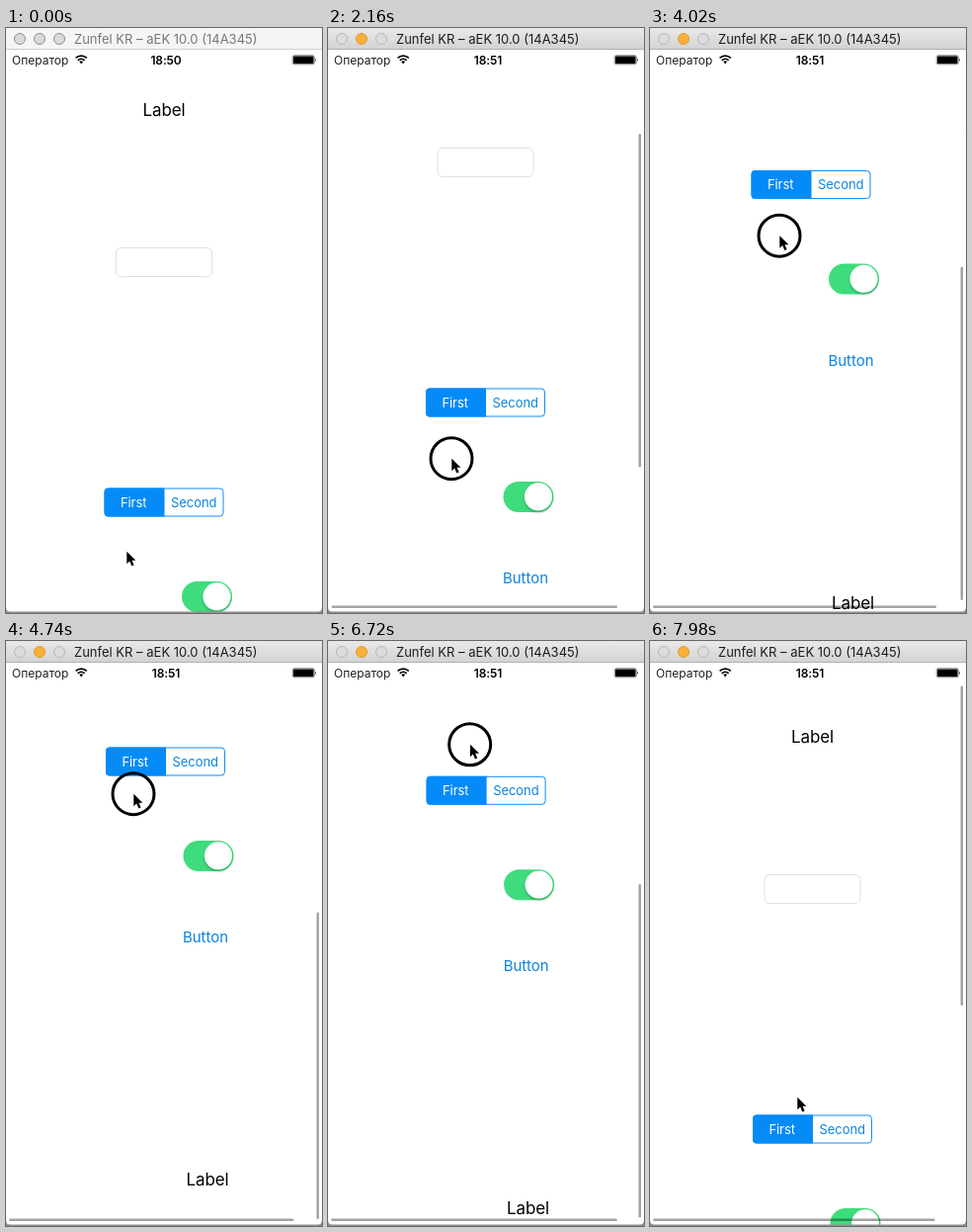
Recreate the animation shown at these times as an HTML page. Size 320x592 px, loop 8 s.

```html
<!DOCTYPE html>
<html lang="en">
<head>
<meta charset="utf-8">
<title>Scroll view demo</title>
<style>
  html, body { margin: 0; width: 100%; height: 100%; overflow: hidden; background: #fff; }
  svg { display: block; width: 320px; height: 592px; font-family: Inter, Roboto, sans-serif; }
  .mid { text-anchor: middle; }
  .label { font-size: 17px; letter-spacing: -.1px; }
  .seg { font-size: 13px; letter-spacing: -.05px; }
  .button { font-size: 15px; letter-spacing: -.05px; }
  .blue { fill: #0a84e0; }
  .bar { fill: #000; fill-opacity: .36; }
  #lights circle { fill: #dadada; stroke: #8e8e8e; }
  #title { font-size: 13px; fill: #777; }
  .active #lights circle { fill: #dcdcdc; stroke: #b8b8b8; }
  .active #lights .amber { fill: #f9b03a; stroke: #dd9a33; }
  .active #title { fill: #1c1c1c; }
  .active #chrome { fill: url(#steel); }
  .active #rule { fill: #b1b1b1; }
</style>
</head>
<body>
<svg id="stage" viewBox="0 0 320 592">
  <defs>
    <linearGradient id="steel" x2="0" y2="1">
      <stop stop-color="#e9e9e9"/><stop offset="1" stop-color="#d2d2d2"/>
    </linearGradient>
    <filter id="soft" x="-30%" y="-30%" width="160%" height="170%">
      <feDropShadow dx="0" dy="2" stdDeviation="1.5" flood-opacity=".24"/>
    </filter>
    <clipPath id="view"><rect y="42" width="320" height="549"/></clipPath>
  </defs>
  <rect width="320" height="592" fill="#fff"/>

  <g clip-path="url(#view)">
    <g id="content">
      <text class="label mid" x="160" y="89">Label</text>
      <rect x="111.5" y="222.5" width="97" height="29" rx="5" fill="#fff" stroke="#e0e0e0"/>
      <g transform="translate(0 -.5)">
        <rect x="100" y="466.5" width="120" height="28" rx="3.5" fill="#fff" stroke="#108cf6"/>
        <path d="M160.5 466v29H103.5a4 4 0 0 1-4-4V470a4 4 0 0 1 4-4z" fill="#058bf8"/>
        <text class="seg mid" x="129.2" y="485.3" fill="#fff">First</text>
        <text class="seg mid blue" x="190.3" y="485.3">Second</text>
      </g>
      <rect x="178" y="560" width="51" height="31" rx="15.5" fill="#3fdc7d"/>
      <circle cx="213.5" cy="575.3" r="14" fill="#fff" filter="url(#soft)"/>
      <text class="button mid blue" x="200.5" y="663">Button</text>
      <text class="label mid" x="202.5" y="909">Label</text>
    </g>
    <g id="bars">
      <rect id="vbar" class="bar" x="314.5" width="2.5" rx="1.25"/>
      <rect id="hbar" class="bar" y="584.5" height="2.5" rx="1.25"/>
    </g>
  </g>

  <g font-size="12">
    <text x="6" y="36.5" fill="#222">Оператор</text>
    <g fill="none" stroke="#000" stroke-width="1.7">
      <path d="M70.6 30.4a8 8 0 0 1 11.2 0M72.8 32.8a5 5 0 0 1 6.8 0"/>
      <path d="M74.3 34.1a2.8 2.8 0 0 1 3.8 0L76.2 36.4z" fill="#000" stroke="none"/>
    </g>
    <text id="clock" class="mid" x="162" y="36.5" font-weight="600" letter-spacing="-.15"></text>
    <rect x="290.25" y="27.75" width="22" height="9" rx="1.8" fill="none" stroke="#000" stroke-width=".5"/>
    <rect x="291" y="28.5" width="20.5" height="7.5" rx="1"/>
    <path d="M313.2 30.5q1.6 1.7 0 3.5z"/>
  </g>

  <rect id="chrome" width="320" height="22" fill="#f5f5f5"/>
  <rect id="rule" y="21" width="320" height="1" fill="#cfcfcf"/>
  <g id="lights">
    <circle cx="14" cy="11" r="5.5"/>
    <circle cx="34" cy="11" r="5.5" class="amber"/>
    <circle cx="54" cy="11" r="5.5"/>
  </g>
  <text id="title" x="69" y="16">Zunfel KR – aEK 10.0 (14A345)</text>
  <path d="M0 586q0 4.5 4.5 4.5h311q4.5 0 4.5-4.5v6H0z" fill="#929292"/>

  <g id="pointer">
    <circle id="ring" cy="1.7" r="21" fill="none" stroke="#000" stroke-width="3"/>
    <path d="M.3 1.8v12.4l2.9-2.7 2.1 5 2.3-1-2.1-4.8h3.9z" stroke="#fff" stroke-width="1.6" paint-order="stroke"/>
  </g>
</svg>
<script>
const LOOP = 8000, STEP = 60, END = -331;

// time, pointer x, pointer y, scroll x, scroll y
const keys = [
  [0, 122, 528, 0, 0],
  [180, 122, 548, 0, 0],
  [1080, 122, 548, 0, 0],
  [1200, 122, 536, 0, 0],
  [2160, 125, 434, -.5, -101],
  [3240, 131, 290, 3, -246.5],
  [4020, 131, 208.5, 3, -321.5],
  [4740, 129, 153, 1.5, -358],
  [5160, 129, 153, 1.5, -358],
  [5340, 129, 154, .6, -341],
  [5640, 128, 157, 0, END],
  [5700, 128, 157, 0, END],
  [6060, 136, 314, 0, END],
  [6420, 142, 74, 0, END],
  [6540, 142, 74, 0, END],
  [6660, 143, 92, 0, END],
  [7260, 150, 226, 4, -198],
  [7920, 150, 445, 4.5, 12.5],
  [7980, 149, 460, 4.5, 14]
];

const $ = id => document.getElementById(id);
const clamp = (v, lo, hi) => Math.min(hi, Math.max(lo, v));

const slope = (i, c) => (keys[i + 1][c] - keys[i][c]) / (keys[i + 1][0] - keys[i][0]);

// Harmonic mean of neighbouring slopes keeps the curve monotone.
function tangent(i, c) {
  if (i === 0 || i === keys.length - 1) return slope(Math.max(0, i - 1), c);
  const a = slope(i - 1, c), b = slope(i, c);
  return a * b > 0 ? 2 * a * b / (a + b) : 0;
}

function sample(t, c) {
  let i = keys.length - 2;
  while (i > 0 && keys[i][0] > t) i--;
  const a = keys[i], b = keys[i + 1], h = b[0] - a[0];
  const u = clamp((t - a[0]) / h, 0, 1), v = 1 - u;
  return a[c] * (1 + 2 * u) * v * v + b[c] * u * u * (3 - 2 * u)
    + h * u * v * (tangent(i, c) * v - tangent(i + 1, c) * u);
}

function setRect(el, pos, len, start, size) {
  el.setAttribute(pos, start);
  el.setAttribute(len, size);
}

function draw(time) {
  const t = Math.floor(time % LOOP / STEP) * STEP;
  const [px, py, sx, sy] = [1, 2, 3, 4].map(c => sample(t, c));

  $('content').setAttribute('transform', `translate(${sx} ${sy})`);
  $('pointer').setAttribute('transform', `translate(${px} ${py})`);

  const pressed = t >= 660 && t < 5220 || t >= 6420 && t < 7920;
  $('ring').style.display = pressed ? '' : 'none';

  const active = t >= 660;
  $('stage').classList.toggle('active', active);
  $('clock').textContent = active ? '18:51' : '18:50';

  const over = Math.max(0, sy, END - sy);
  const top = 45.5 - clamp(sy, END, 0) * .61;
  setRect($('vbar'), 'y', 'height', top + (sy < END ? over : 0), 337.5 - over);
  setRect($('hbar'), 'x', 'width', 3 + Math.max(0, -sx), 290 - Math.abs(sx));
  const fade = t < 6000 ? clamp((6000 - t) / 240, 0, 1) : clamp((t - 6540) / 120, 0, 1);
  $('bars').style.opacity = t < 1200 ? 0 : fade;
}

const begin = performance.now();
function tick() {
  draw(performance.now() - begin);
  requestAnimationFrame(tick);
}
tick();
</script>
</body>
</html>
```
